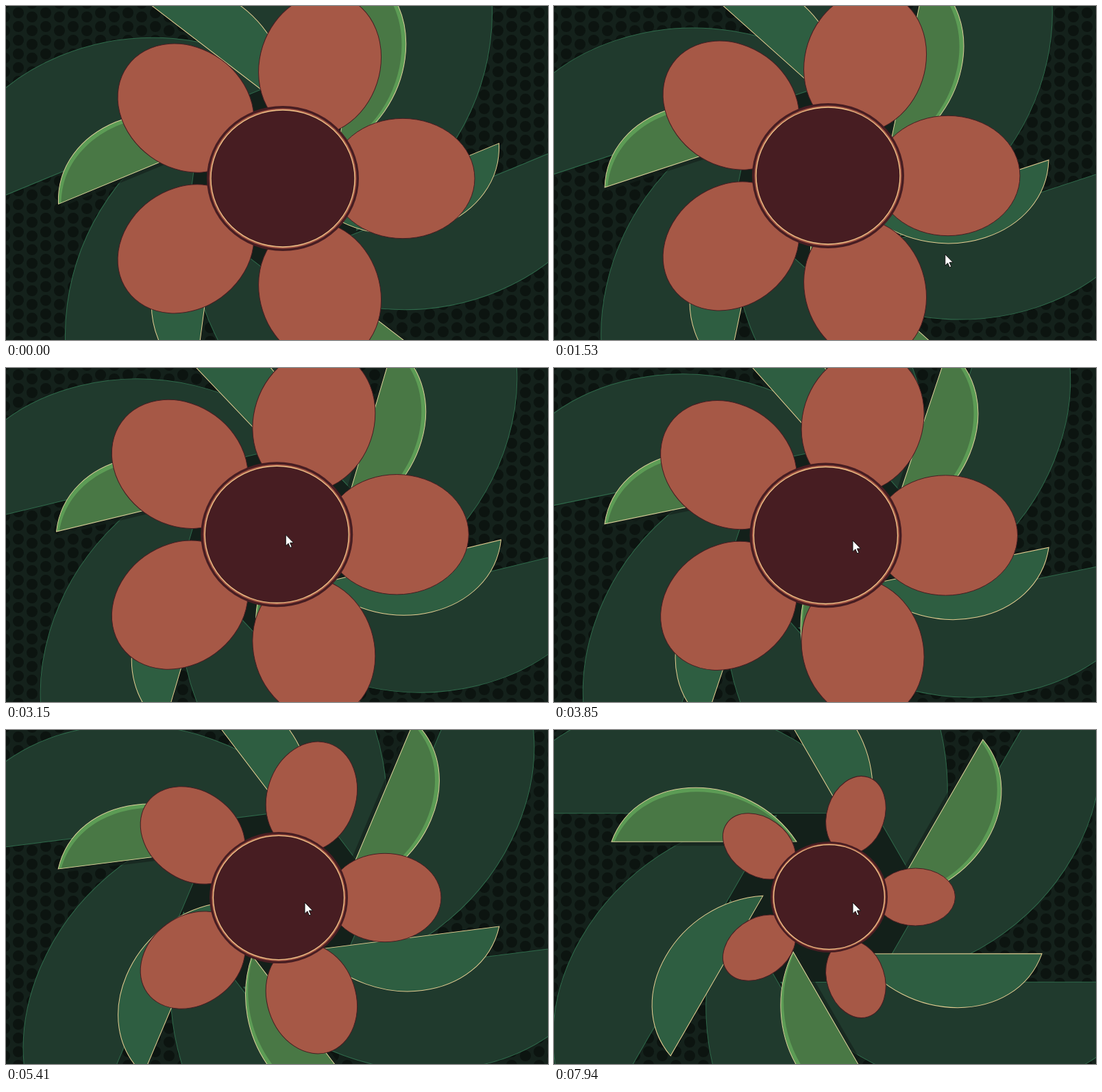
Recreate the animation shown at these times as an HTML page with a canvas. Size 791x488 px, loop 8000 ms.

```html
<!DOCTYPE html>
<html lang="en">
<head>
<meta charset="utf-8">
<title>Turning flower</title>
<style>
html, body { margin: 0; width: 100%; height: 100%; overflow: hidden; background: #14211b; }
canvas { display: block; }
</style>
</head>
<body>
<canvas id="stage" width="791" height="488"></canvas>
<script>
const ctx = document.getElementById('stage').getContext('2d');
const W = 791, H = 488, LOOP = 8000;
const PIVOT = { x: 398, y: 245 };
const RAD = Math.PI / 180;

// time, centre x, centre y
const drift = [[0, 404, 252], [900, 404, 252], [1530, 400, 248], [2440, 394, 242],
  [3850, 396.5, 244.5], [5410, 398, 245], [6470, 398, 245], [7940, 401.5, 244]];
// time, petal distance, petal length and width radii, disc radii
const size = [[0, 175, 105, 87.7, 111, 106], [3900, 175, 105, 87.7, 111, 106],
  [5410, 155, 82, 64.7, 101, 96], [6470, 145, 73, 55.8, 96, 91], [7940, 126, 58, 42, 85.5, 81]];
// time, pointer tip
const pointer = [[900, 655, 500], [1530, 571, 363], [2440, 380, 235], [3850, 436, 252]];

function sample(keys, t) {
  const last = keys[keys.length - 1];
  if (t >= last[0]) return last.slice(1);
  const i = Math.max(1, keys.findIndex(k => k[0] > t));
  const a = keys[i - 1], b = keys[i];
  const p = Math.max(0, (t - a[0]) / (b[0] - a[0]));
  return a.slice(1).map((v, n) => v + (b[n + 1] - v) * p);
}

function paint(shape, fill, stroke, width = 1) {
  if (fill) { ctx.fillStyle = fill; ctx.fill(shape); }
  if (stroke) { ctx.strokeStyle = stroke; ctx.lineWidth = width; ctx.stroke(shape); }
}

function blade(tip, edge, length, bulge) {
  const p = new Path2D();
  p.moveTo(tip, edge);
  p.bezierCurveTo(tip + 0.1407 * length, edge - bulge, tip + 0.7407 * length, edge - bulge, tip + length, edge);
  p.closePath();
  return p;
}

function oval(x, y, rx, ry) {
  const p = new Path2D();
  p.ellipse(x, y, rx, ry, 0, 0, Math.PI * 2);
  return p;
}

const frond = blade(-478, -123.5, 545, 210);
const leaf = blade(-314, -82, 270, 105);

const arrow = new Path2D('M0 0V16.5L3.9 12.8L6.5 19L9 17.9L6.4 11.9H11.6Z');

const dots = new Path2D();
for (let i = -1; i < 40; i++) {
  for (let j = -1; j < 26; j++) {
    const x = 18 + i * 20, y = 10 + j * 20 + (i & 1 ? 6 : 0);
    dots.moveTo(x + 8, y);
    dots.arc(x, y, 8, 0, Math.PI * 2);
  }
}

function ring(count, origin, angle, draw) {
  for (let k = 0; k < count; k++) {
    ctx.save();
    ctx.translate(origin.x, origin.y);
    ctx.rotate((angle + k * 360 / count) * RAD);
    draw(k);
    ctx.restore();
  }
}

function drawLeaf(k) {
  if (k % 2) {
    paint(leaf, '#2e5e41', '#e6cf93');
    return;
  }
  ctx.save();
  ctx.translate(1, 6);
  paint(leaf, 'rgba(20,33,27,0.65)');
  ctx.restore();
  paint(leaf, '#5c9c55');
  ctx.save();
  ctx.clip(leaf);
  ctx.translate(2, 6);
  paint(leaf, '#497845');
  ctx.restore();
  paint(leaf, null, '#dcd09a');
}

function drawFlower(t) {
  const [x, y] = sample(drift, t);
  const [far, len, wid, rx, ry] = sample(size, t);
  const petal = oval(far, 0, len, wid);
  ring(5, { x, y }, 0, () => paint(petal, '#a65846', '#471d22'));
  const s = rx / 111;
  paint(oval(x, y, rx, ry), '#471d22');
  paint(oval(x, y, rx - 3.5 * s, ry - 3.5 * s), '#a65846');
  paint(oval(x, y, rx - 6 * s, ry - 6 * s), '#471d22', '#f0c58a', 1.3);
}

function drawPointer(t) {
  if (t < pointer[0][0]) return;
  const [x, y] = sample(pointer, t);
  ctx.save();
  ctx.translate(x, y);
  paint(arrow, '#fff', '#111');
  ctx.restore();
}

function render(t) {
  const turn = -22.5 + 2.83 * t / 1000;
  ctx.fillStyle = '#14211b';
  ctx.fillRect(0, 0, W, H);
  paint(dots, '#0c1410');
  paint(oval(PIVOT.x, PIVOT.y, 142, 142), '#13201a');
  ring(6, PIVOT, turn, () => paint(frond, '#203a2d', '#2f6a4b'));
  ring(6, PIVOT, turn, drawLeaf);
  drawFlower(t);
  drawPointer(t);
}

const start = performance.now();
function tick() {
  render((performance.now() - start) % LOOP);
  requestAnimationFrame(tick);
}
tick();
</script>
</body>
</html>
```
